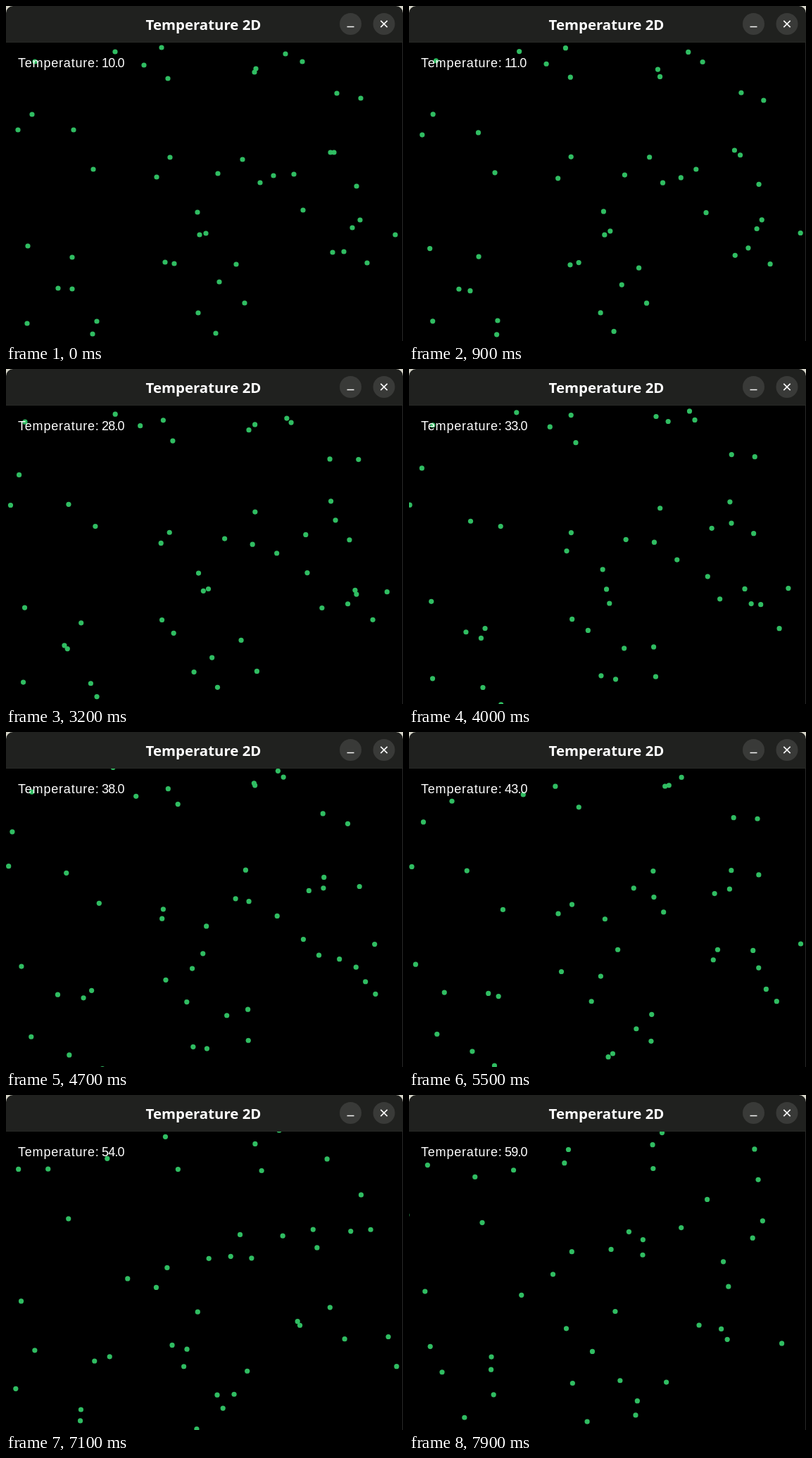
Animation of 564 by 476 pixels, one loop 8000 ms. Source, as an HTML page:

```html
<!DOCTYPE html>
<html lang="en">
<head>
<meta charset="utf-8">
<title>Temperature 2D</title>
<style>
  html, body { margin: 0; width: 100%; height: 100%; overflow: hidden; background: #d6d5c9; }
  svg { display: block; width: 564px; height: 476px; }
  .title { font: 700 20.4px "Noto Sans", "Open Sans", sans-serif; fill: #fff; text-anchor: middle; }
  .reading { font: 18px "Liberation Sans", Arial, sans-serif; fill: #fff; }
  .label { letter-spacing: .8px; }
  .value { letter-spacing: -.8px; }
  .icon { fill: none; stroke: #f4f4f4; stroke-width: 1.7; }
  #dots { fill: #30bd62; }
</style>
</head>
<body>
<svg viewBox="0 0 564 476">
  <rect y="50" width="564" height="426"/>
  <g id="dots"></g>
  <text class="reading" y="87"><tspan class="label" x="17">Temperature:</tspan><tspan class="value" id="value" x="136">10.0</tspan></text>
  <path d="M563.5 52V476" stroke="#292929"/>

  <path d="M0 52V10A10 10 0 0 1 10 0H554A10 10 0 0 1 564 10V52Z" fill="#20211f"/>
  <path d="M0 51.5H564" stroke="#262724"/>
  <text class="title" x="280.5" y="34">Temperature 2D</text>
  <g fill="#393a38">
    <circle cx="489.5" cy="25.5" r="15.5"/>
    <circle cx="537" cy="25.5" r="15.5"/>
  </g>
  <path class="icon" d="M484.5 29.5H494.5M532.3 20.8L541.7 30.2M541.7 20.8L532.3 30.2"/>
</svg>
<script>
const LOOP = 8000, STEP = 100, FRAMES = LOOP / STEP;
const JITTER = 0.16; // largest step per degree, in pixels

// Where the particles start, as x, y pairs.
const origin = [
  155,65, 221,59, 41,79, 196,84, 230,103, 355,89, 353,94, 397,68, 421,79, 470,124,
  504,131, 37,154, 17,176, 96,176, 124,232, 233,215, 214,243, 301,238, 336,218, 361,251,
  380,241, 409,239, 461,208, 466,208, 498,256, 422,290, 503,304, 492,315, 553,325, 464,350,
  480,349, 513,365, 272,293, 275,325, 284,323, 31,341, 94,357, 74,401, 94,402, 226,364,
  239,366, 327,367, 303,392, 339,422, 273,436, 298,465, 30,451, 129,448, 123,466];

// Holds at 10, then climbs from 0.8 s on, a little slower towards the end.
function temperature(t) {
  const s = t / 1000 - 0.9;
  return Math.max(10, Math.round(10.9 + 7.4 * s - 0.07 * s * s));
}

function seeded(s) {
  return () => {
    s = (s + 0x6D2B79F5) | 0;
    let r = Math.imul(s ^ (s >>> 15), 1 | s);
    r = (r + Math.imul(r ^ (r >>> 7), 61 | r)) ^ r;
    return ((r ^ (r >>> 14)) >>> 0) / 4294967296;
  };
}

// Each coordinate wanders at random, in steps that grow with the heat.
const random = seeded(2024);
const walks = origin.map(from => {
  const walk = [from];
  for (let n = 1; n < FRAMES; n++) {
    walk.push(walk[n - 1] + (random() * 2 - 1) * JITTER * temperature(n * STEP));
  }
  return walk;
});

const dots = [];
for (let i = 0; i < origin.length; i += 2) {
  const dot = document.createElementNS("http://www.w3.org/2000/svg", "circle");
  dot.setAttribute("r", 3.6);
  dots.push(document.getElementById("dots").appendChild(dot));
}
const value = document.getElementById("value");

function draw(n) {
  dots.forEach((dot, i) => {
    dot.setAttribute("cx", walks[2 * i][n]);
    dot.setAttribute("cy", walks[2 * i + 1][n]);
  });
  value.textContent = temperature(n * STEP).toFixed(1);
}

const start = performance.now();
function tick() {
  const t = (performance.now() - start) % LOOP;
  draw(Math.floor(t / STEP));
  requestAnimationFrame(tick);
}
tick();
</script>
</body>
</html>
```
